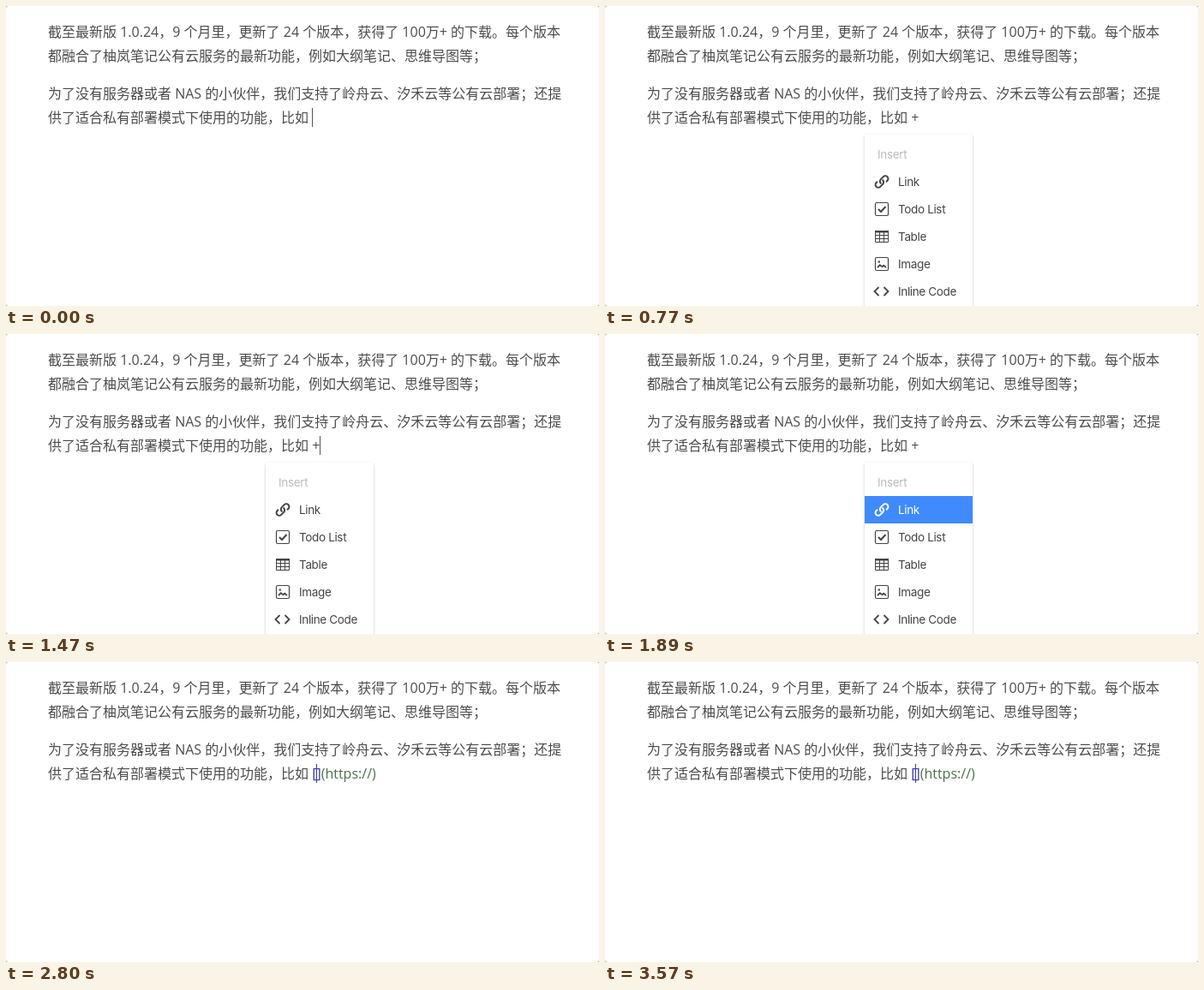
Write an HTML page that moves like this. It is 692 px wide and 350 px high and loops after 3640 ms.

```html
<!DOCTYPE html>
<html lang="zh-CN">
<head>
<meta charset="utf-8">
<title>Insert menu</title>
<style>
  html, body { margin: 0; width: 100%; height: 100%; overflow: hidden; background: #a8a8a8; }
  svg { display: block; width: 692px; height: 350px; }
  .doc { font: 16px "Open Sans", "Noto Sans CJK SC", "Noto Sans CJK", sans-serif; fill: #4c4c4c; }
  .menu { font: 13.5px Inter, Roboto, sans-serif; letter-spacing: -.35px; color: #444; }
  .menu text { fill: currentColor; }
  .menu .title { fill: #bcbcbc; }
  .panel { fill: #fff; filter: drop-shadow(0 1px 1.5px rgba(0, 0, 0, .22)); }
  .icon { fill: none; stroke: currentColor; }
  .solid { fill: currentColor; stroke: none; }
  .picked { color: #fff; }
</style>
</head>
<body>
<svg viewBox="0 0 692 350">
  <rect width="692" height="350" rx="3" fill="#fff"/>

  <g class="doc">
    <text x="49" y="36">截至最新版 1.0.24，9 个月里，更新了 24 个版本，获得了 100万+ 的下载。每个版本</text>
    <text x="49" y="64">都融合了柚岚笔记公有云服务的最新功能，例如大纲笔记、思维导图等；</text>
    <text x="49" y="108">为了没有服务器或者 NAS 的小伙伴，我们支持了岭舟云、汐禾云等公有云部署；还提</text>
    <text x="49" y="136">供了适合私有部署模式下使用的功能，比如</text>
    <text id="plus" x="357.2" y="136">+</text>
    <text id="markup" x="357.2" y="136" fill="#3a36b0">[]<tspan fill="#4a7049">(https://)</tspan></text>
  </g>

  <g id="menu" class="menu">
    <rect class="panel" x="303" y="150" width="126" height="220" rx="3"/>
    <text class="title" x="318" y="178">Insert</text>

    <g id="link">
      <g class="icon" transform="translate(315 197)" stroke-width="2">
        <path id="hook" d="M8.6 5.6l.6.6a3.3 3.3 0 0 1 0 4.67l-3 3a3.3 3.3 0 0 1-4.67-4.67l1.4-1.4"/>
        <use href="#hook" transform="rotate(180 8 8)"/>
      </g>
      <text x="342" y="210">Link</text>
    </g>

    <g class="icon" transform="translate(315 229)">
      <rect x=".5" y=".5" width="15" height="15" rx="1.5" stroke-width="1.2"/>
      <path d="M4 8l3 3 5.5-6" stroke-width="2"/>
    </g>
    <text x="342" y="242">Todo List</text>

    <g class="icon" transform="translate(315 261)">
      <path d="M.5 1.5h15v13H.5zM0 6.5h16M0 10.5h16M5.5 3v12M10.5 3v12"/>
      <path class="solid" d="M0 1h16v2.5H0z"/>
    </g>
    <text x="342" y="274">Table</text>

    <g class="icon" transform="translate(315 293)">
      <rect x=".5" y=".5" width="15" height="15" rx="1.5" stroke-width="1.2"/>
      <circle class="solid" cx="4.8" cy="5.5" r="1.2"/>
      <path d="M3 12l2.8-2.8 2.7 2 1.7-1.5 2.8 2.3" stroke-width="1.8"/>
    </g>
    <text x="342" y="306">Image</text>

    <path class="icon" d="M319.5 328l-5 5 5 5M325.5 328l5 5-5 5" stroke-width="1.8"/>
    <text x="342" y="338">Inline Code</text>

    <g id="pick" class="picked">
      <rect x="303" y="189" width="126" height="32" fill="#3f8bfd"/>
      <use href="#link"/>
    </g>
  </g>

  <g fill="#555">
    <rect id="caretStart" x="357" y="119" width="1" height="22"/>
    <rect id="caretPlus" x="366" y="119" width="1" height="22"/>
    <rect id="caretLink" x="362" y="119" width="1" height="22" fill="#3a36b0"/>
  </g>
</svg>
<script>
const LOOP = 3640;
const TYPED = 70, MENU = 140, PICKED = 1610, INSERTED = 2590;

// Spans of [from, to) in ms during which each part is visible.
const visible = {
  plus: [[TYPED, INSERTED]],
  menu: [[MENU, INSERTED]],
  pick: [[PICKED, INSERTED]],
  markup: [[INSERTED, LOOP]],
  caretStart: [[0, TYPED]],
  caretPlus: [[TYPED, 595], [1085, 1610], [2100, INSERTED]],
  caretLink: [[INSERTED, 3080], [3570, LOOP]]
};

for (const [id, spans] of Object.entries(visible)) {
  const isOn = t => spans.some(([from, to]) => t >= from && t < to);
  const times = [...new Set([0, ...spans.flat(), LOOP])].sort((a, b) => a - b);
  const frames = times.map(t => ({
    offset: t / LOOP,
    opacity: isOn(t) ? 1 : 0,
    easing: "steps(1, end)"
  }));
  const motion = document.getElementById(id).animate(frames, { duration: LOOP, iterations: Infinity });
  motion.startTime = 0;
}
</script>
</body>
</html>
```
